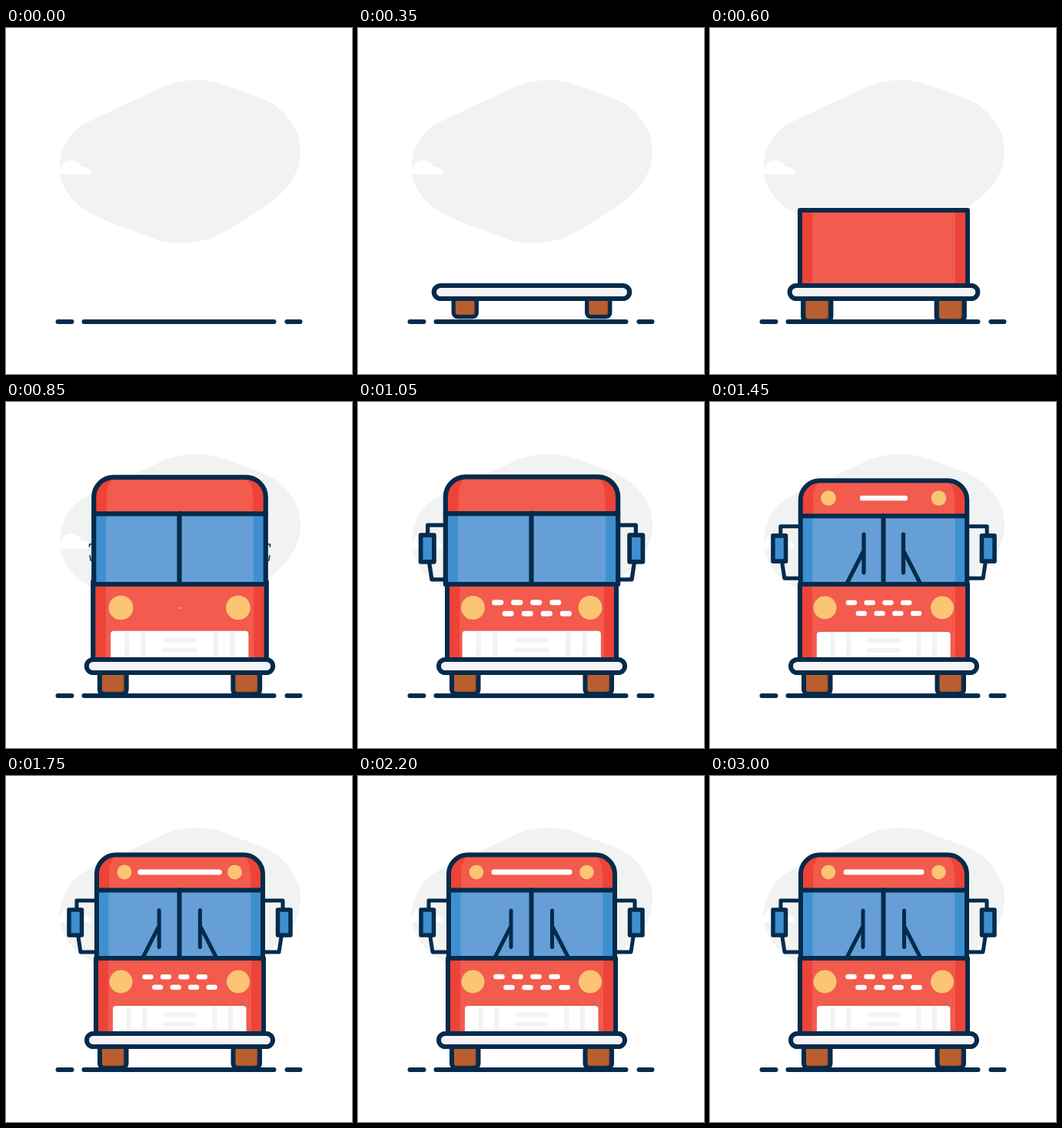
An HTML page for the animation above (3.05 s loop, 450 by 450 pixels).

```html
<!DOCTYPE html>
<html lang="en">
<head>
<meta charset="utf-8">
<title>Bus</title>
<style>
  html, body { margin: 0; width: 100%; height: 100%; overflow: hidden; background: #fff; }
  svg { display: block; width: 100vw; height: 100vh; }
  .line { fill: none; stroke: #042b4b; stroke-width: 6; stroke-linecap: round; stroke-linejoin: round; }
  .thin { stroke-width: 5; }
  .red { fill: #f25b4e; }
  .shade { fill: #ee4338; }
  .lamp { fill: #fbc574; }
  .pale { fill: none; stroke: #f1f3f4; stroke-width: 6; }
  .white { fill: none; stroke: #fff; stroke-width: 6.6; stroke-linecap: round; }
</style>
</head>
<body>
<svg viewBox="0 0 450 450">
  <defs>
    <g id="wheel">
      <path fill="#a94f24" d="M122 345H156.500V374a6 6 0 0 1-6 6H128a6 6 0 0 1-6-6Z"/>
      <path fill="#b95f2f" d="M122 345H152V371a5 5 0 0 1-5 5H122Z"/>
      <path class="line" d="M122 345H156.500V374a6 6 0 0 1-6 6H128a6 6 0 0 1-6-6Z"/>
    </g>
    <path id="arm" class="line thin" d="M117 162H92V172M94 209L97 229H117"/>
    <rect id="glass" class="line" x="82" y="174" width="16.500" height="33" style="fill:#3f8fd0;stroke-width:5.500"/>
    <path id="wiper" class="line thin" d="M199 175V222.500M198 197L178.500 235"/>
    <path id="shell" d="M118 237V127.500a25 25 0 0 1 25-25H309a25 25 0 0 1 25 25V237Z"/>
    <clipPath id="inside"><use href="#shell"/></clipPath>
  </defs>

  <path fill="#f1f3f3" d="M70 183C70 150 88 130 113 119L205 76C228 66 255 66 275 71L334 92C364 105 383 133 383 158C383 190 366 212 338 231C315 246 290 263 270 272C245 281 220 281 200 277L134 252C96 238 70 214 70 183Z"/>
  <path fill="#fff" d="M67 190.500H110C110 184 106 180 98 181C95 170 77 168 72 179C70 181 68 184 67 190.500Z"/>
  <path class="line" d="M67.500 382H85.500M101.500 382H348.500M365.500 382H382.500"/>

  <g data-pop="wheelL"><use href="#wheel"/></g>
  <g data-pop="wheelR"><use href="#wheel" transform="translate(173.500)"/></g>
  <g data-pop="armL"><use href="#arm"/></g>
  <g data-pop="armR"><use href="#arm" transform="translate(452) scale(-1 1)"/></g>
  <g data-pop="glassL"><use href="#glass"/></g>
  <g data-pop="glassR"><use href="#glass" transform="translate(452) scale(-1 1)"/></g>

  <g data-pop="body">
    <rect class="red" x="117" y="237" width="218" height="100"/>
    <path class="shade" d="M117 237h16v100h-16ZM319 237h16v100h-16Z"/>
    <rect class="line" x="117" y="237" width="218" height="100"/>
  </g>

  <g data-pop="grille">
    <path fill="#fff" d="M139 334V303q0-4 4-4H308.500q4 0 4 4V334Z"/>
    <path class="pale" d="M159.500 300V334M180 300V334M271.500 300V334M292 300V334"/>
    <path class="pale" stroke-linecap="round" d="M207 310.500H245M207 323H245"/>
  </g>
  <g data-pop="lampL"><circle class="lamp" cx="149.500" cy="267.500" r="15"/></g>
  <g data-pop="lampR"><circle class="lamp" cx="302" cy="267.500" r="15"/></g>
  <g data-pop="slats"><path id="slats" class="white"/></g>

  <g data-pop="cab">
    <g clip-path="url(#inside)">
      <rect class="red" x="115" y="99" width="222" height="49"/>
      <path class="shade" d="M115 148V99H147Q134 109 134 126V148ZM337 148V99H305Q318 109 318 126V148Z"/>
      <rect fill="#659fd6" x="115" y="148" width="222" height="89"/>
      <path fill="#3f8fd0" d="M115 148h18.500v89h-18.500ZM318.500 148h18.500v89h-18.500Z"/>
    </g>
    <use href="#shell" class="line"/>
    <path class="line" d="M118 148.500H334M225.500 148V237"/>
  </g>
  <g data-pop="wiperL"><use href="#wiper"/></g>
  <g data-pop="wiperR"><use href="#wiper" transform="translate(451.500) scale(-1 1)"/></g>
  <g data-pop="roofL"><circle class="lamp" cx="154" cy="125" r="9.300"/></g>
  <g data-pop="roofR"><circle class="lamp" cx="297.500" cy="125" r="9.300"/></g>
  <g data-pop="stripe"><path class="white" style="stroke-width:7" d="M177 125H275"/></g>

  <g data-pop="bumper">
    <rect class="line" x="105" y="335" width="242" height="17" rx="8.500" style="fill:#f4f4f6"/>
  </g>
</svg>
<script>
const LOOP = 3050, STEP = 50;

// Rises past full size once, then settles.
const pop = u => u <= 0 ? 0 : 1 + (u / 150 - 1) * Math.exp(-0.0097 * u);
// Swings around full size before resting.
const spring = u => u <= 0 ? 0 : 1 - Math.exp(-0.0037 * u) * Math.cos(u * Math.PI / 400);
const wide = s => [s, Math.min(1, s * 1.6)];

// part: [start ms, origin x, origin y]
const parts = {
  bumper: [30, 226, 344],
  wheelL: [250, 139.5, 345], wheelR: [250, 312.5, 345],
  body: [450, 226, 336],
  lampL: [620, 149.5, 267.5], lampR: [620, 302, 267.5],
  cab: [670, 226, 237],
  grille: [672, 226, 333],
  armL: [828, 116, 195.5], armR: [828, 336, 195.5],
  glassL: [850, 90, 190.5], glassR: [850, 362, 190.5],
  slats: [838, 226, 268],
  wiperL: [1120, 178, 236], wiperR: [1120, 273.5, 236],
  roofL: [1220, 154, 125], roofR: [1220, 297.5, 125],
  stripe: [1400, 226, 125]
};

const dashes = (x, y) => [0, 1, 2, 3].map(i => `M${x + i * 24} ${y}h8`).join("");
document.getElementById("slats").setAttribute("d", dashes(179.5, 261) + dashes(192.5, 275));

const nodes = Object.keys(parts).map(name => [name, document.querySelector(`[data-pop=${name}]`)]);

function draw(t) {
  for (const [name, node] of nodes) {
    const [start, x, y] = parts[name];
    const s = (name === "slats" ? spring : pop)(t - start);
    const [sx, sy] = name === "bumper" || name === "stripe" ? wide(s) : [s, s];
    node.style.display = s > 0 ? "" : "none";
    node.setAttribute("transform", `translate(${x} ${y}) scale(${sx} ${sy}) translate(${-x} ${-y})`);
  }
}

const origin = performance.now();
function tick() {
  const t = (performance.now() - origin) % LOOP;
  draw(Math.floor(t / STEP) * STEP);
  requestAnimationFrame(tick);
}
draw(0);
requestAnimationFrame(tick);
</script>
</body>
</html>
```
